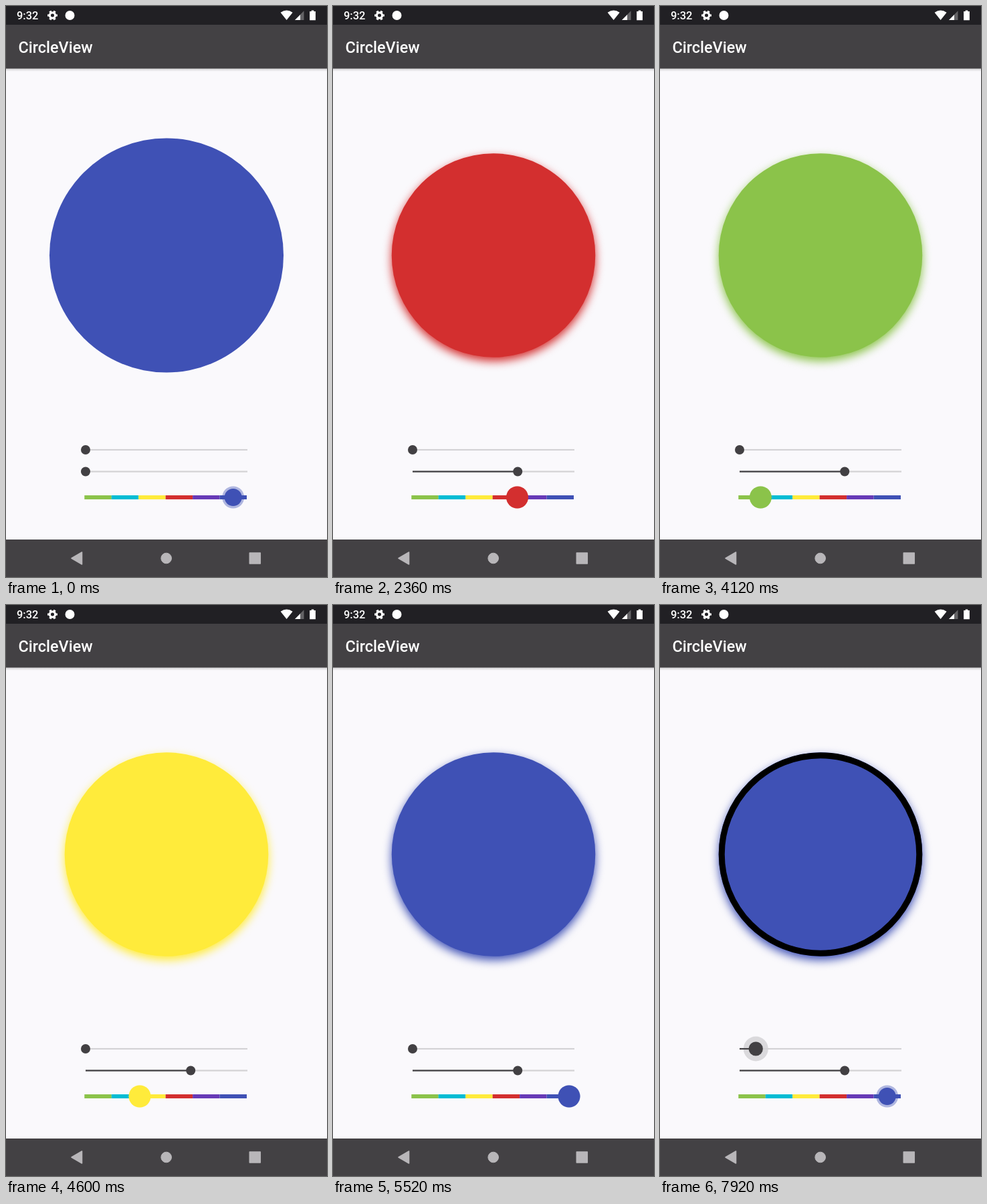
An HTML page for the animation above (8000 ms loop, 480 px wide and 853 px high).

```html
<!DOCTYPE html>
<html lang="en">
<head>
<meta charset="utf-8">
<title>CircleView</title>
<style>
  html, body { margin: 0; width: 100%; height: 100%; overflow: hidden; background: #faf9fc; }
  svg { display: block; width: 100%; height: 100%; }
  text { font-family: Roboto, sans-serif; font-weight: 500; fill: #fff; }
</style>
</head>
<body>
<svg viewBox="0 0 480 853">
  <defs>
    <linearGradient id="fade" x2="0" y2="1">
      <stop stop-color="#000" stop-opacity=".17"/>
      <stop offset="1" stop-color="#000" stop-opacity="0"/>
    </linearGradient>
    <filter id="soft" x="-15%" y="-15%" width="130%" height="130%" color-interpolation-filters="sRGB">
      <feGaussianBlur id="blur" stdDeviation="1"/>
    </filter>
  </defs>
  <rect width="480" height="853" fill="#faf9fc"/>

  <!-- app bar -->
  <rect y="93" width="480" height="5" fill="url(#fade)"/>
  <rect y="27" width="480" height="66.5" fill="#434144"/>
  <rect width="480" height="28" fill="#212024"/>
  <text x="18.5" y="70" font-size="23.4">CircleView</text>

  <!-- status bar -->
  <text x="16" y="20" font-size="16.4">9:32</text>
  <g fill="none" stroke="#fff">
    <circle cx="69.5" cy="14" r="4.1" stroke-width="3.2"/>
    <circle cx="69.5" cy="14" r="6.2" stroke-width="2.6" pathLength="12" stroke-dasharray="1 1" stroke-dashoffset=".5"/>
  </g>
  <g fill="#fff">
    <circle cx="95.5" cy="14" r="7"/>
    <path d="M419.6 21 L410.6 9.8 Q419.6 3.4 428.6 9.8 Z"/>
    <path d="M432 21 L445.5 7.3 V21 Z" opacity=".3"/>
    <path d="M432 21 L440 12.9 V21 Z"/>
    <path d="M456.7 6.5 h3.6 v1.6 h2.6 v13.2 h-8.8 v-13.2 h2.6 Z"/>
  </g>

  <!-- navigation bar -->
  <rect y="797" width="480" height="56" fill="#434144"/>
  <g fill="#b8b6b9" stroke="#b8b6b9" stroke-linejoin="round">
    <path d="M98 825 L113.5 816 V834 Z" stroke-width="1.6"/>
    <circle cx="239.7" cy="825" r="7.8"/>
    <rect x="364.3" y="817" width="16" height="16" stroke-width="1.5"/>
  </g>

  <!-- circle -->
  <circle id="shadow" cx="240" filter="url(#soft)"/>
  <circle id="disc" cx="240" cy="372.5"/>
  <circle id="border" cx="240" cy="372.5" fill="none" stroke="#000"/>

  <g id="sliders"></g>
  <g id="bar"></g>
  <circle id="halo" cy="734" r="16.5" opacity=".4"/>
  <circle id="knob" cy="734"/>
</svg>
<script>
const LOOP = 8000, STEP = 40;
const LEFT = 119, SPAN = 242;
const BAR = 117.3, SEG = 40.45;
const COLORS = ['#8bc34a', '#00bcd4', '#ffeb3b', '#d32f2f', '#673ab7', '#3f51b5'];
const DARK = '#424043';

// [time, value] pairs
const borderX = [[6760, 119], [7280, 136], [7680, 136], [7920, 143.3]];
const borderPress = [[6680, 0], [6840, 1]];
const shadowX = [[400, 119], [520, 123], [1200, 258], [1360, 268], [1640, 276.2]];
const shadowPress = [[360, 0], [520, 1], [1600, 1], [1760, 0]];
const colorX = [[2120, 339.7], [2360, 275.5], [2920, 155], [2960, 149], [3040, 148], [3160, 138],
  [4000, 138], [4600, 200], [4800, 244], [4880, 246], [5520, 353], [5680, 358], [5880, 358], [6200, 339.7]];
const colorPress = [[2120, 0], [2240, 1], [5880, 1], [6200, 0]];

const $ = id => document.getElementById(id);

function add(parent, tag, attrs) {
  const el = document.createElementNS('http://www.w3.org/2000/svg', tag);
  set(el, attrs);
  return parent.appendChild(el);
}

function set(el, attrs) {
  for (const k in attrs) el.setAttribute(k, attrs[k]);
}

function at(keys, t) {
  if (t <= keys[0][0]) return keys[0][1];
  for (let i = 1; i < keys.length; i++) {
    const [t0, a] = keys[i - 1], [t1, b] = keys[i];
    if (t < t1) return a + (b - a) * (t - t0) / (t1 - t0);
  }
  return keys[keys.length - 1][1];
}

function makeSlider(y) {
  const g = $('sliders');
  const ripple = add(g, 'circle', { cy: y, r: 18.5, fill: '#000' });
  add(g, 'rect', { x: LEFT, y: y - 1.1, width: SPAN, height: 2.2, fill: '#d3d2d5' });
  const fill = add(g, 'rect', { x: LEFT, y: y - 1.1, height: 2.2, fill: DARK });
  const thumb = add(g, 'circle', { cy: y, fill: DARK });
  return (x, press) => {
    set(ripple, { cx: x, opacity: 0.13 * press });
    set(fill, { width: x - LEFT });
    set(thumb, { cx: x, r: 7 + 3.6 * press });
  };
}

const borderSlider = makeSlider(663);
const shadowSlider = makeSlider(695.5);
COLORS.forEach((fill, i) =>
  add($('bar'), 'rect', { x: BAR + i * SEG, y: 731, width: SEG, height: 6, fill }));

function draw(t) {
  const bx = at(borderX, t), sx = at(shadowX, t), cx = at(colorX, t);
  borderSlider(bx, at(borderPress, t));
  shadowSlider(sx, at(shadowPress, t));

  const fill = COLORS[Math.min(5, Math.max(0, Math.floor((cx - BAR) / SEG)))];
  set($('halo'), { cx, fill });
  set($('knob'), { cx, fill, r: 13 + 3.5 * at(colorPress, t) });

  const depth = 17.5 * (sx - LEFT) / SPAN;
  const r = 175 - 2 * depth;
  const w = 90 * (bx - LEFT) / SPAN;
  set($('disc'), { r, fill });
  set($('border'), { r: r - w / 2, 'stroke-width': w });
  set($('blur'), { stdDeviation: 0.577 * depth + 0.5 });
  set($('shadow'), { r, cy: 372.5 + depth / 2, fill, visibility: depth > 0 ? 'visible' : 'hidden' });
}

const start = performance.now();
function tick() {
  const t = (performance.now() - start) % LOOP;
  draw(Math.floor(t / STEP) * STEP);
  requestAnimationFrame(tick);
}
tick();
</script>
</body>
</html>
```
